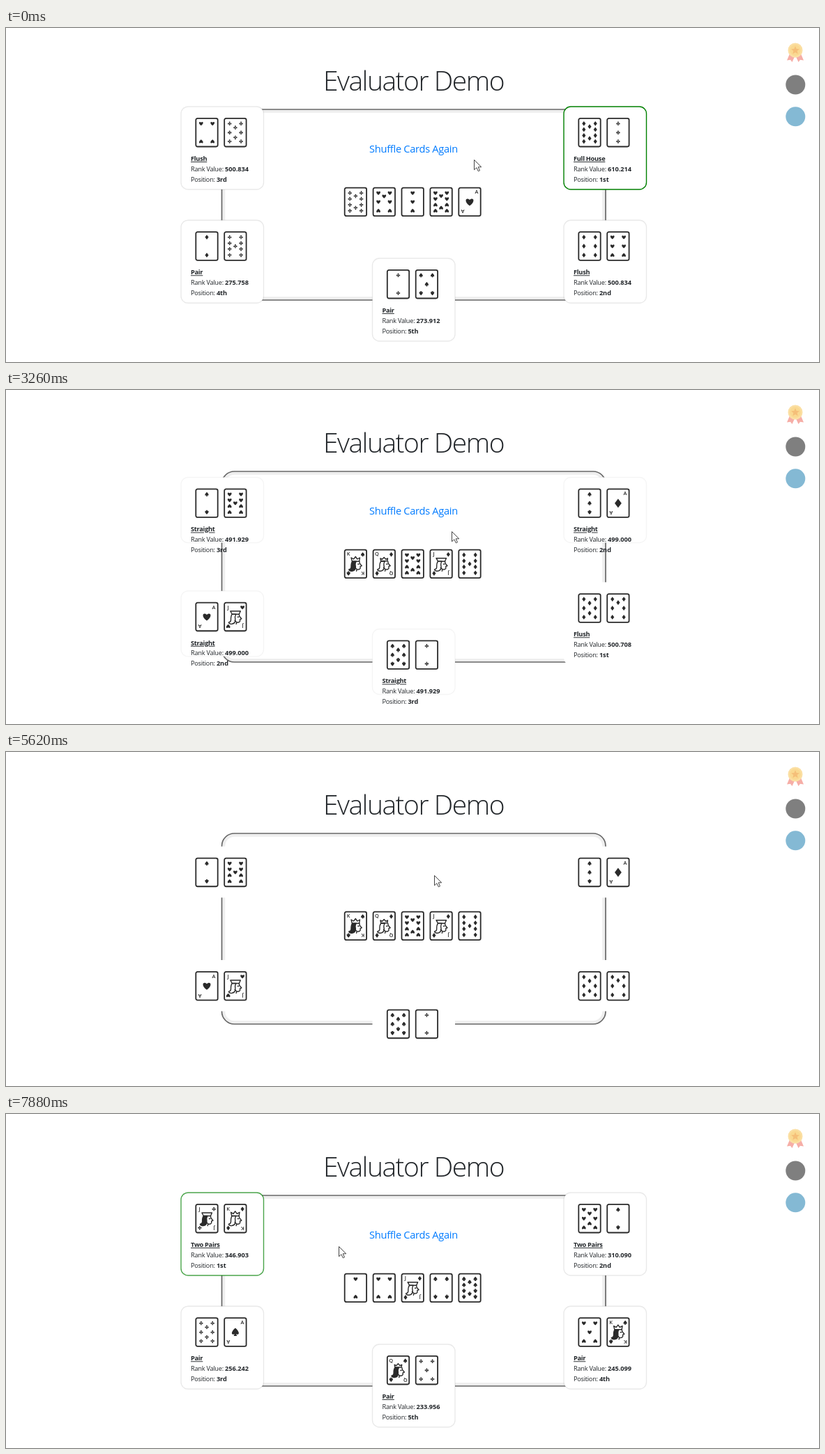
An HTML page that plays this animation: 1166x480 px, repeating every 8 s.

```html
<!DOCTYPE html>
<html lang="en">
<head>
<meta charset="utf-8">
<title>Evaluator Demo</title>
<style>
  html, body { margin: 0; width: 100%; height: 100%; overflow: hidden; background: #fff; }
  svg { display: block; width: 1166px; height: 480px; }
  text { font-family: "Open Sans", "Noto Sans", sans-serif; fill: #212529; }
  .title { font-size: 39px; font-weight: 300; letter-spacing: -1.5px; text-anchor: middle; }
  .link { font-size: 14.6px; letter-spacing: -.28px; text-anchor: middle; }
  .info text { font-size: 9.2px; letter-spacing: -.25px; }
  .info .hand { font-weight: 700; text-decoration: underline; }
  .info tspan { font-weight: 700; letter-spacing: 0; }
  .card { fill: #2a2a2a; }
  .card text { font-size: 7.4px; font-weight: 600; text-anchor: middle; fill: #2a2a2a; }
  .paper { fill: #fff; stroke: #2a2a2a; stroke-width: 1.8; }
  .line { fill: none; stroke: #2a2a2a; stroke-width: 1.4; stroke-linejoin: round; stroke-linecap: round; }
  .box { fill: #fff; stroke-width: 1.4; }
</style>
</head>
<body>
<svg viewBox="0 0 1166 480">
  <text class="title" x="584.500" y="90">Evaluator Demo</text>

  <g fill="none">
    <rect x="312.3" y="119.8" width="544.9" height="268.4" rx="15.2" stroke="#eee" stroke-width="4"/>
    <rect x="309.5" y="117" width="550.5" height="274" rx="18" stroke="#666" stroke-width="1.7"/>
  </g>

  <g id="medal">
    <path fill="#f6aea7" d="M1124 37l-4 9.500 5-.8 2.500 3.300 4.500-10 4.500 10 2.500-3.300 5 .8-4-9.500z"/>
    <circle cx="1132" cy="32" r="10.500" fill="#fbdfa3"/>
    <circle cx="1132" cy="32" r="8" fill="#fad991"/>
    <path fill="#f5bf79" d="M1132 26l1.700 4 4.200.3-3.200 2.800 1 4.200-3.700-2.300-3.700 2.300 1-4.200-3.200-2.800 4.200-.3z"/>
  </g>
  <circle cx="1132.300" cy="81.500" r="14" fill="#7f7f7f"/>
  <circle cx="1132.300" cy="127.300" r="14" fill="#84b9d4"/>

  <text class="link" id="link" x="584.500" y="179">Shuffle Cards Again</text>
  <g id="boxes"></g>
  <g id="rounds"></g>
  <path id="cursor" d="M.5.5V14.800L3.900 11.700 6.300 16.800 8.500 15.800 6.200 10.800H10.700Z"
        fill="#fff" stroke="#444" stroke-width="1"/>
</svg>

<script>
const LOOP = 8000, FULL = 119, FOLDED = 73.5, MOVE = 500;
const CARD = { w: 33.2, h: 42.4, step: 40.9 };
const $ = id => document.getElementById(id);

// Top-left corner of each player's box
const seats = [[251, 113], [800, 113], [251, 276.3], [800, 276.3], [525.5, 331]];

// deal: cards appear; show/hide: text toggles; grow/shrink: box transitions start
const rounds = [
  { board: 'Tc 7h 3h Th Ah', winner: 1, deal: 0, show: 0, grow: -2000, hide: 880, shrink: 885,
    players: ['4h 8c|Flush|500.834|3rd', 'Td 3c|Full House|610.214|1st', '2d 9c|Pair|275.758|4th',
              '6d 6h|Flush|500.834|2nd', '2c 5s|Pair|273.912|5th'] },
  { board: 'Ks Qd Th Jd 9d', winner: 3, deal: 1760, show: 3260, grow: 3125, hide: 5260, shrink: 5140,
    players: ['2s 9h|Straight|491.929|3rd', '3s Ad|Straight|499.000|2nd', 'Ah Jh|Straight|499.000|2nd',
              '8d 7d|Flush|500.708|1st', '8s 2c|Straight|491.929|3rd'] },
  { board: '2h 4h Jd 4s Ts', winner: 0, deal: 5880, show: 7370, grow: 7265, hide: 9000, shrink: 9000,
    players: ['Jc Kd|Two Pairs|346.903|1st', '8h 2s|Two Pairs|310.090|2nd', '8c As|Pair|256.242|3rd',
              '5h Ks|Pair|245.099|4th', 'Qs 5c|Pair|233.956|5th'] }
];

// The screen refreshes only at these moments
const ticks = [0, 110, 880, 1000, 1130, 1260, 1370, 1760, 3260, 3370, 3490, 3620, 3740, 3870,
  4510, 4760, 5260, 5380, 5500, 5620, 5880, 6270, 7370, 7520, 7640, 7760, 7880];

const pointer = [[0, 671, 189], [110, 631, 177], [2000, 631, 177], [3260, 639, 203], [4510, 625, 189],
  [4760, 614, 177], [6120, 614, 177], [6270, 614, 191], [7370, 614, 191], [7880, 477, 190], [8000, 477, 190]];

const suits = {
  h: 'M0 3.200C-5.200-.5-3-4.300 0-1.700 3-4.300 5.200-.5 0 3.200z',
  d: 'M0-3.700L2.800 0 0 3.700-2.800 0z',
  s: 'M0-3.400C4.200.2 3.200 3 .6 1.500L1.400 3.200H-1.400L-.6 1.500C-3.200 3-4.200.2 0-3.400z',
  c: [[-1.1, -1.9], [-3, .2], [.8, .2]].map(([x, y]) =>
    `M${x} ${y}a1.100 1.100 0 1 1 2.200 0a1.100 1.100 0 1 1-2.200 0`).join('') +
    'M-.4-1.500H.4V-.2H1.500V.6H.4L1 3H-1L-.4.6H-1.500V-.2H-.4z'
};
const middle = { 2: [0, 1], 3: [0, .5, 1], 5: [.5], 7: [.19], 8: [.22, .78], 9: [.5], 10: [.17, .83] };
const hats = {
  K: 'M11.500 17.500L10.300 12.300 13.800 14.300 16.500 10.800 19 14.300 22.700 12.300 21.800 17.500z',
  Q: 'M12 17L11.300 13.300 14 14.600 16.500 11.800 19 14.600 21.800 13.300 21.200 17z',
  J: 'M9.500 13H24L22 17.500H12z'
};

const pip = (suit, x, y, size = .92, turn = y > 22) =>
  `<path d="${suits[suit]}" transform="translate(${x} ${y}) rotate(${turn ? 180 : 0}) scale(${size})"/>`;

const twice = mark => mark + `<g transform="rotate(180 ${CARD.w / 2} ${CARD.h / 2})">${mark}</g>`;

function pips(n, suit) {
  const rows = n > 8 ? 4 : n > 5 ? 3 : n > 3 ? 2 : 0;
  const y = f => 8.3 + 25.8 * f;
  let out = '';
  for (let i = 0; i < rows; i++) {
    const at = y(i / (rows - 1));
    out += pip(suit, 8.4, at) + pip(suit, CARD.w - 8.4, at);
  }
  return out + (middle[n] || []).map(f => pip(suit, CARD.w / 2, y(f))).join('');
}

function portrait(rank, suit) {
  const hair = 'sc'.includes(suit) ? '#2a2a2a' : 'none';
  return `<path class="line" d="${hats[rank]}"/>
    <path class="line" d="M22 17.500L22.500 20.500 25.500 24 23.300 24.800V27.500Q22 30 18.500 29L15.800 26.500
      M18.500 29L17.800 31.500M20 21.500H21.200"/>
    <path class="line" style="fill:${hair}" d="M12 17.500H17.500Q15.500 21 16.500 24.500 17.300 30.500 11.500 31.500
      8 32 7 29.300 10 29 10.200 26 10 20 12 17.500z"/>`;
}

function card(code, x, y) {
  const [rank, suit] = code;
  let face;
  if (rank === 'A') face = twice('<text x="26.600" y="9.800">A</text>') + pip(suit, CARD.w / 2, CARD.h / 2, 1.75);
  else if (hats[rank]) face = twice(`<text x="6.200" y="9.800">${rank}</text>` + pip(suit, 26.8, 7.6)) + portrait(rank, suit);
  else face = pips(rank === 'T' ? 10 : +rank, suit);
  return `<g class="card" transform="translate(${x} ${y})">
    <rect class="paper" x=".9" y=".9" width="${CARD.w - 1.8}" height="${CARD.h - 1.8}" rx="2.400"/>${face}</g>`;
}

const cards = (list, x, y) => list.split(' ').map((c, i) => card(c, x + i * CARD.step, y)).join('');

function player(line) {
  const [hand, name, value, place] = line.split('|');
  return `<g class="seat">${cards(hand, 20.4, 16)}<g class="info">
    <text class="hand" x="14" y="78">${name}</text>
    <text x="14" y="92.700">Rank Value: <tspan>${value}</tspan></text>
    <text x="14" y="107.500">Position: <tspan>${place}</tspan></text></g></g>`;
}

$('boxes').innerHTML = seats.map(([x]) => `<rect class="box" x="${x}" width="118.500" rx="10"/>`).join('');
$('rounds').innerHTML = rounds.map(r => `<g>${cards(r.board, 484.8, 228.7)}${r.players.map(player).join('')}</g>`).join('');

const boxes = [...$('boxes').children];
const layers = [...$('rounds').children].map(node => ({
  node, seats: [...node.querySelectorAll('.seat')], info: [...node.querySelectorAll('.info')]
}));

const clamp = v => Math.min(1, Math.max(0, v));

// cubic-bezier(.25, .1, .25, 1)
function ease(x) {
  x = clamp(x);
  const curve = (a, b, s) => 3 * a * s * (1 - s) ** 2 + 3 * b * s * s * (1 - s) + s ** 3;
  let lo = 0, hi = 1;
  for (let i = 0; i < 20; i++) {
    const s = (lo + hi) / 2;
    if (curve(.25, .25, s) < x) lo = s; else hi = s;
  }
  return curve(.1, 1, lo);
}

function pointerAt(t) {
  const i = pointer.findIndex(k => k[0] > t);
  const [t0, x0, y0] = pointer[i - 1], [t1, x1, y1] = pointer[i];
  const f = (t - t0) / (t1 - t0);
  return [x0 + (x1 - x0) * f, y0 + (y1 - y0) * f];
}

function draw(time) {
  const t = ticks.filter(k => k <= time).pop();
  const index = rounds.filter(r => r.deal <= t).length - 1;
  const r = rounds[index];
  const open = t >= r.show && t < r.hide;
  const left = t < r.hide ? 1 : 1 - ease((t - r.shrink) / MOVE);
  const size = t < r.show ? 0 : t < r.hide ? ease((t - r.grow) / MOVE) : left;
  const glow = t < r.show ? 0 : t < r.hide ? clamp((t - r.grow - 260) / MOVE) : left;

  layers.forEach((l, i) => l.node.style.display = i === index ? '' : 'none');
  seats.forEach(([x, y], i) => {
    const wins = i === r.winner;
    const h = FOLDED + (FULL - FOLDED) * (wins && open ? 1 : size);
    const top = y + (FULL - h) / 2;
    boxes[i].setAttribute('y', top);
    boxes[i].setAttribute('height', h);
    boxes[i].setAttribute('stroke', wins ? `rgba(0,128,0,${glow})` : `rgba(0,0,0,${.085 * size})`);
    layers[index].seats[i].setAttribute('transform', `translate(${x} ${top})`);
    layers[index].info[i].style.display = open ? '' : 'none';
  });

  const [px, py] = pointerAt(t);
  $('cursor').setAttribute('transform', `translate(${px} ${py})`);
  $('link').style.display = open ? '' : 'none';
  $('link').style.fill = py < 184 ? '#0056b3' : '#007bff';
}

const start = performance.now();
function frame() {
  draw((performance.now() - start) % LOOP);
  requestAnimationFrame(frame);
}
frame();
</script>
</body>
</html>
```
